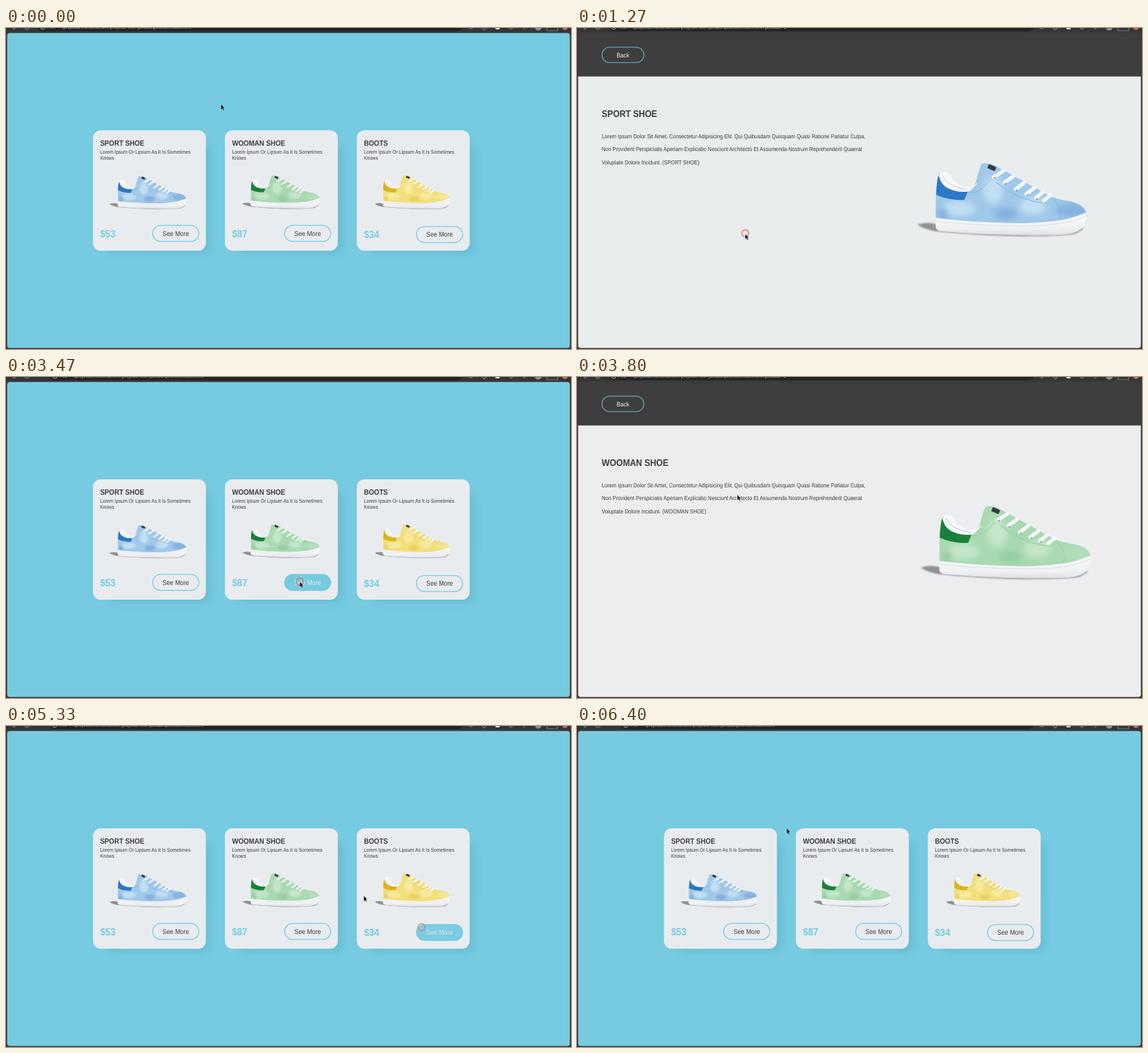
An HTML page that plays this animation: 846x480 px, repeating every 6470 ms.

```html
<!DOCTYPE html>
<html lang="en">
<head>
<meta charset="utf-8">
<title>Shoe cards</title>
<style>
  html, body { margin: 0; width: 100%; height: 100%; overflow: hidden; background: #38393b; }
  svg#stage { display: block; width: 100vw; height: 100vh; }
  text { font-family: "Liberation Sans", Arial, sans-serif; fill: #3c3c3e; text-rendering: geometricPrecision; }
  #home text, #detail text { transform: scaleY(1.13); transform-box: fill-box; transform-origin: center; }
  .bold { font-weight: 700; }
  .mid { text-anchor: middle; }
  .price { font-size: 13.8px; fill: #76cbe1; }
  .url { font-size: 7px; fill: #b9babd; }
  .btn { --h: 0%; }
  .btn rect { fill: color-mix(in srgb, var(--rest), #76cbe1 var(--h)); stroke: #76cbe1; stroke-width: 1.3; }
  .more { --rest: #e9ecef; font-size: 9.2px; }
  .more text { fill: color-mix(in srgb, #3c3c3e, #e9ecef var(--h)); }
  .back { --rest: #3e3e3e; font-size: 8.5px; }
  .back rect { stroke: #6fb9cb; stroke-width: 1.1; }
  .back text { fill: color-mix(in srgb, #f4f4f4, #5c5c6a var(--h)); }
  .sport { --base: #9fc8e9; --light: #c1dff2; --heel: #2b78c6; --deep: #84afdf; --toe: #86b2e0; }
  .wooman { --base: #a9d9b2; --light: #c4e6c9; --heel: #18803a; --deep: #97cda3; --toe: #b2deb9; }
  .boots { --base: #f2df7c; --light: #f8ea9d; --heel: #dcb321; --deep: #ebd260; --toe: #f6e78e; }
  .base { fill: var(--base); }
  .light { fill: var(--light); }
  .heel { fill: var(--heel); }
  .deep { fill: var(--deep); }
  .toe { fill: var(--toe); }
  .seam { fill: none; stroke: var(--deep); stroke-width: 1; }
</style>
</head>
<body>
<svg id="stage" viewBox="0 0 846 480" preserveAspectRatio="none">
  <defs>
    <filter id="soft" x="-30%" y="-30%" width="160%" height="160%"><feGaussianBlur stdDeviation="4"/></filter>
    <filter id="haze" x="-20%" y="-80%" width="140%" height="260%"><feGaussianBlur stdDeviation="1.3"/></filter>
    <filter id="cardShade" x="-20%" y="-20%" width="140%" height="140%"><feGaussianBlur stdDeviation="6"/></filter>
    <clipPath id="upperClip">
      <path d="M32 18C27 32 27 65 27 87C80 94 190 97 253 80C253 70 243 62 228 59C215 57 205 55 196 50L122 9C114 4 102 1 96 3C92 10 90 22 87 31C82 41 72 45 60 42C48 39 40 31 36 18Z"/>
    </clipPath>
    <linearGradient id="sole" x1="0" y1="0" x2="0" y2="1">
      <stop offset="0" stop-color="#fbfbfc"/><stop offset=".7" stop-color="#eff0f3"/><stop offset="1" stop-color="#dcdee2"/>
    </linearGradient>
    <g id="shoe">
      <g filter="url(#haze)">
        <path d="M0 94C10 90 22 91 34 95L60 107L28 104C16 102 4 98 0 94Z" fill="#8f9195"/>
        <path d="M30 103C90 112 190 114 236 108L249 100L240 98L60 102Z" fill="#96999e"/>
      </g>
      <path d="M74 44C80 38 88 32 94 25L103 30L92 44Z" fill="#80848b"/>
      <g clip-path="url(#upperClip)">
        <rect class="base" x="20" width="240" height="100"/>
        <g filter="url(#soft)">
          <ellipse class="light" cx="62" cy="70" rx="25" ry="11"/>
          <ellipse class="light" cx="113" cy="42" rx="15" ry="21"/>
          <ellipse class="light" cx="173" cy="66" rx="20" ry="13"/>
          <ellipse class="deep" cx="132" cy="78" rx="17" ry="9"/>
          <ellipse class="toe" cx="231" cy="72" rx="24" ry="10"/>
          <ellipse class="deep" cx="38" cy="78" rx="7" ry="10"/>
        </g>
        <path class="heel" d="M30 20L35 26C39 38 56 45 75 45L70 57C52 58 38 54 25 48Z"/>
        <path class="seam" d="M74 46C88 48 99 40 110 25M199 51C211 64 216 74 212 87M118 31C139 48 164 60 194 62"/>
      </g>
      <path d="M32 21C35 12 46 13 50 22C56 33 66 38 78 38L91 31L78 44C62 47 46 42 39 35C35 31 33 26 32 21Z" fill="#f6f7f9"/>
      <path d="M37 20C42 30 54 40 74 41" fill="none" stroke="#d3d6dc" stroke-width="1.2"/>
      <rect x="105" y="5.5" width="12" height="6.5" rx="1" transform="rotate(24 111 9)" fill="#343b42"/>
      <path d="M114 23L128 14M130 31L143 22M147 41L159 32M163 48L175 39M177 54L188 45M189 58L199 50" stroke="#f6f8fb" stroke-width="5.5" stroke-linecap="round"/>
      <path d="M115 24h1M131 33h1M148 43h1M164 50h1M178 56h1" stroke="#9aa0ab" stroke-width="2.4" stroke-linecap="round"/>
      <path d="M27 84C75 90 130 92 170 92C205 91 232 85 252 76C254 83 252 93 244 101C237 107 222 110 201 110.5C150 111 85 109 38 105C31 104 27 101 27 96Z" fill="url(#sole)"/>
      <path d="M28 89C80 95 150 97 190 95C215 93 238 88 252 81" fill="none" stroke="#dcdee3" stroke-width="1"/>
      <path d="M33 104C90 109.5 180 111 220 109.5C235 108 243 104 247 99" fill="none" stroke="#b4b6bb" stroke-width="1"/>
    </g>
    <clipPath id="view"><rect x="1.7" y="7.5" width="842.6" height="471" rx="4"/></clipPath>
  </defs>

  <rect width="846" height="480" fill="#38393b"/>
  <g id="bar">
    <path d="M0 0H846V5H0Z" fill="#333436"/>
    <g fill="none" stroke="#77797c" stroke-width="1.2">
      <path d="M10 0L12 2L14 0"/>
      <path d="M28 0A4 4 0 0 0 35 0"/>
      <path d="M672 0L674 2.5L677 0M693 0L696 1L699 0M713 0L716 3L719 0M753 0L756 2L759 0M775 2L779 -1"/>
      <path d="M810 -3V4H826V-3"/>
    </g>
    <rect x="733" y="-3" width="6" height="5" fill="#eee"/>
    <circle cx="797" cy="-1" r="5" fill="#8c8d91"/>
    <circle cx="837" cy="-1" r="4" fill="#d6675b"/>
    <rect id="pill" y="-14" height="19" rx="8" fill="#232427"/>
    <g id="address">
      <circle cx="8" cy="-1" r="3.2" fill="none" stroke="#aaa"/>
      <text class="url" x="15" y="0.7">File</text>
      <text class="url" id="url" x="37" y="0.7"></text>
    </g>
  </g>
  <g clip-path="url(#view)">
    <g id="home"></g>
    <g id="detail"></g>
  </g>
  <circle id="ring" fill="none" stroke="#dc5f55" stroke-width="1.6"/>
  <path id="cursor" d="M0 0V8L1.8 6.4L3.1 9.2L4.4 8.6L3.1 5.9H5.3Z" fill="#0b0b0b" stroke="#fff" stroke-opacity=".55" stroke-width=".5"/>
</svg>

<script>
const LOOP = 6470, START = 400, STEP = 200 / 3, FADE = 300, RING = 420;
const $ = id => document.getElementById(id);

// small and big: x, y, x scale, y scale of the shoe
const items = [
  { id: 'sport', name: 'SPORT SHOE', price: '$53', drop: 0, tint: '#e9edee',
    small: [155, 220.5, .4545, .4545], big: [510, 200, 1, 1] },
  { id: 'wooman', name: 'WOOMAN SHOE', price: '$87', drop: 0, tint: '#ebedef',
    small: [354, 219.3, .458, .46], big: [515.3, 191, 1.005, 1] },
  { id: 'boots', name: 'BOOTS', price: '$34', drop: 1.6, tint: '#e9edee',
    small: [552.5, 219.2, .443, .465], big: [516, 193.3, .97, 1.02] },
];
const lines = [
  'Lorem Ipsum Dolor Sit Amet, Consectetur Adipisicing Elit. Qui Quibusdam Quisquam Quasi Ratione Pariatur Culpa,',
  'Non Provident Perspiciatis Aperiam Explicabo Nesciunt Architecto Et Assumenda Nostrum Reprehenderit Quaerat',
];

// page shown from each time on; -1 is the card list
const pages = [[0, -1], [1200, 0], [2400, -1], [3667, 1], [4400, -1], [5400, 2], [6267, -1]];
const clicks = [[1130, 252, 307], [2230, 76, 38], [3330, 440, 306],
                [4130, 78, 41], [5130, 622, 301], [5980, 90, 44]];
const hovers = [['more0', 930, 1400], ['back', 2080, 2400], ['more1', 3100, 3667],
                ['back', 4000, 4400], ['more2', 4960, 5320], ['back', 5980, 6130]];
const path = [
  [0, 322, 114], [400, 322, 114], [1050, 252, 307], [1333, 252, 308],
  [1730, 194, 212], [2180, 76, 38], [2400, 76, 38], [2533, 92, 58],
  [3270, 440, 306], [3470, 440, 306], [3800, 240, 176], [4100, 78, 41],
  [4330, 78, 41], [5080, 622, 301], [5180, 622, 301], [5333, 536, 254],
  [5960, 90, 44], [6030, 90, 44], [6133, 102.5, 55], [6400, 314, 153], [6470, 322, 130],
];

const label = (x, y, size, str, cls = '') =>
  `<text x="${x}" y="${y}" font-size="${size}" class="${cls}">${str}</text>`;

const shoe = (id, [x, y, sx, sy]) =>
  `<use href="#shoe" class="${id}" transform="translate(${x} ${y}) scale(${sx} ${sy})"/>`;

const button = (id, cls, x, y, w, h, str) =>
  `<g id="${id}" class="btn ${cls}"><rect x="${x}" y="${y}" width="${w}" height="${h}" rx="${h / 2}"/>
   <text class="mid" x="${x + w / 2}" y="${y + h / 2 + 3.2}">${str}</text></g>`;

function card(item, i) {
  const x = 130.3 + i * 197.5, tx = x + 10.6, d = item.drop;
  return `<rect x="${x + 20}" y="173" width="157" height="166" rx="12" fill="#2f7f9b" opacity=".17" filter="url(#cardShade)"/>
    <rect x="${x}" y="153" width="169" height="180" rx="11.5" fill="#e9ecef"/>
    ${label(tx, 176, 10.1, item.name, 'bold')}
    ${label(tx, 188, 7.03, 'Lorem Ipsum Or Lipsum As It Is Sometimes')}
    ${label(tx, 197.2, 7.03, 'Knows')}
    ${shoe(item.id, item.small)}
    <text class="bold price" x="${tx}" y="${312 + d}">${item.price}</text>
    ${button('more' + i, 'more', x + 89.4, 295.2 + d, 69, 24, 'See More')}`;
}

const article = item => `<g id="${item.id}">
  <rect y="72.5" width="846" height="408" fill="${item.tint}"/>
  ${label(37, 132.6, 12.66, item.name, 'bold')}
  ${[...lines, `Voluptate Dolore Incidunt. (${item.name})`]
    .map((str, n) => label(37, 164.3 + n * 19.7, 7.745, str)).join('')}
  ${shoe(item.id, item.big)}</g>`;

$('home').innerHTML = '<rect width="846" height="480" fill="#76cbe1"/>' + items.map(card).join('');
$('detail').innerHTML = '<rect width="846" height="73" fill="#3e3e3e"/>' +
  button('back', 'back', 37.4, 28.8, 62.8, 23, 'Back') + items.map(article).join('');

// monotone cubic through the path, so rests stay still
function slope(i, k) {
  if (!i || i === path.length - 1) return 0;
  const rate = j => (path[j + 1][k] - path[j][k]) / (path[j + 1][0] - path[j][0]);
  const a = rate(i - 1), b = rate(i);
  return a * b > 0 ? 2 * a * b / (a + b) : 0;
}
function along(t, k) {
  let i = 0;
  while (i < path.length - 2 && path[i + 1][0] <= t) i++;
  const [p, q] = [path[i], path[i + 1]], span = q[0] - p[0], u = (t - p[0]) / span, v = 1 - u;
  return p[k] * v * v * (1 + 2 * u) + q[k] * u * u * (3 - 2 * u) +
    span * u * v * (v * slope(i, k) - u * slope(i + 1, k));
}

const clamp = v => Math.max(0, Math.min(1, v));
const show = (id, on) => { $(id).style.display = on ? '' : 'none'; };

function draw(time) {
  const t = time < START ? 0 : START + Math.floor((time - START + 5) / STEP) * STEP;
  const page = pages.filter(p => p[0] <= t + 1).pop()[1];
  const left = page < 0 && t > 2000 ? 65 : 47;

  show('home', page < 0);
  show('detail', page >= 0);
  items.forEach((item, i) => show(item.id, i === page));

  $('pill').setAttribute('x', left);
  $('pill').setAttribute('width', 684 - left);
  $('address').setAttribute('transform', `translate(${left})`);
  $('url').textContent = page < 0
    ? '/projects/frontend/html-projects-with-javascript/shoe/index.html'
    : '/projects/frontend/html-projects-with-javascript/shoe/index.html?product=1';

  const level = {};
  for (const [id, from, to] of hovers) {
    const peak = clamp((Math.min(t, to) - from) / FADE);
    level[id] = Math.max(level[id] || 0, clamp(peak - Math.max(0, t - to) / FADE));
  }
  for (const id in level) $(id).style.setProperty('--h', level[id] * 100 + '%');

  const click = clicks.find(c => t >= c[0] && t < c[0] + RING);
  show('ring', click);
  if (click) {
    const age = (t - click[0]) / RING, ring = $('ring');
    ring.setAttribute('cx', click[1]);
    ring.setAttribute('cy', click[2]);
    ring.setAttribute('r', 4.6 + age * 1.6);
    ring.setAttribute('opacity', Math.min(.9, 1.15 * (1 - age)));
  }
  $('cursor').setAttribute('transform', `translate(${along(t, 1)} ${along(t, 2)})`);
}

const begin = performance.now();
function tick() {
  draw((performance.now() - begin) % LOOP);
  requestAnimationFrame(tick);
}
tick();
</script>
</body>
</html>
```
